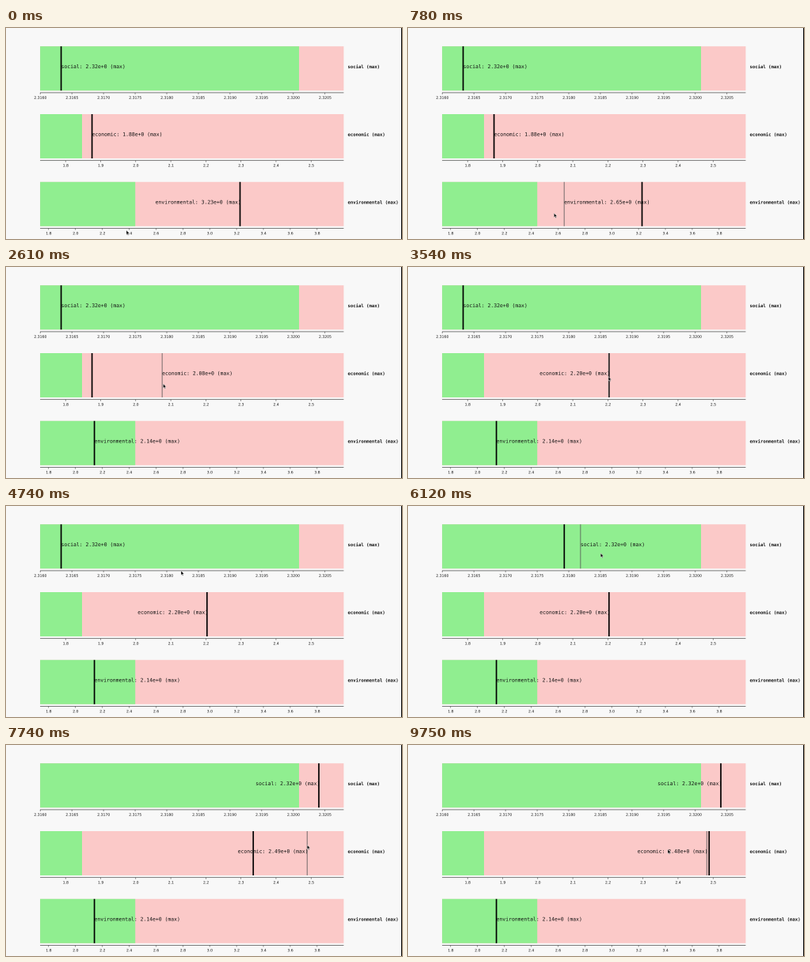
A matplotlib script that plays this animation: 500 by 267 pixels, repeating every 9780 ms.

```python
import numpy as np
import matplotlib.pyplot as plt
from matplotlib.animation import FuncAnimation
from matplotlib.patches import PathPatch, Polygon, Rectangle
from matplotlib.textpath import TextPath
from matplotlib.transforms import Affine2D

W, H, DPI = 500, 267, 72
STEP, FRAMES = 30, 326
LEFT, RIGHT, BAR_H = 43.1, 426.4, 56
HOVER_LAG = 90
MONO = "DejaVu Sans Mono"

# Pointer stops: arrival ms, departure ms, x, y. Leaving after a rest clicks.
STOPS = [
    (0, 0, 152, 256),
    (570, 570, 204.4, 236),
    (1270, 1410, 111.6, 228),
    (2570, 2570, 197.6, 148),
    (3100, 3420, 253.8, 140),
    (4740, 4740, 221, 82),
    (5200, 5870, 197.3, 61),
    (6670, 6750, 395, 55),
    (7200, 7290, 312.2, 132),
    (7640, 8040, 380.2, 126.5),
    (9660, 9660, 377.2, 132),
    (9750, 9750, 328, 132),
]

fig = plt.figure(figsize=(W / DPI, H / DPI), dpi=DPI, facecolor="#f8f8f8")
ax = fig.add_axes([0, 0, 1, 1])
ax.set(xlim=(0, W), ylim=(H, 0))
ax.axis("off")


def pointer(t):
    """Rest at each stop and ease in and out between stops."""
    for (_, leave, *start), (arrive, _, *end) in zip(STOPS, STOPS[1:]):
        if t <= arrive:
            u = np.clip((t - leave) / (arrive - leave), 0, 1)
            return np.array(start) + u * u * (3 - 2 * u) * np.subtract(end, start)
    return np.array(STOPS[-1][2:])


def glyphs(text, x, y, size, align=0.0, family=MONO, weight="normal"):
    """Text outline with its baseline at y; align is 0 left to 1 right."""
    path = TextPath((0, 0), text, size=size,
                    prop={"family": family, "weight": weight})
    shift = align * path.get_extents().x1
    return Affine2D().translate(-shift, 0).scale(1, -1).translate(x, y) \
        .transform_path(path)


def add_text(*args, color="#111", **style):
    return ax.add_patch(PathPatch(glyphs(*args, **style), fc=color, lw=0,
                                  snap=False, zorder=4))


def add_rect(x0, x1, top, height, color):
    ax.add_patch(Rectangle((x0, top), x1 - x0, height, fc=color, lw=0,
                           snap=False))


def add_line(xs, ys, color, width):
    return ax.plot(xs, ys, color=color, lw=width, snap=False,
                   solid_capstyle="butt", zorder=3)[0]


class Slider:
    """A range bar with an axis, a chosen value and a hover preview."""

    def __init__(self, row, name, split, start, tick0, tick_x, step, pitch,
                 fmt):
        self.name, self.start = name, start
        self.top = top = 23.2 + 85.8 * row
        self.to_value = lambda x: tick0 + (x - tick_x) / pitch * step

        add_rect(LEFT, RIGHT, top, BAR_H, "#fbc9c8")
        add_rect(LEFT, split, top, BAR_H, "#90ee90")
        axis_y = top + 58.7
        add_line([LEFT, RIGHT], [axis_y, axis_y], "#444", 0.7)
        for x in np.arange(tick_x, RIGHT - 0.1, pitch):
            add_line([x, x], [axis_y, axis_y + 2], "#444", 0.6)
            add_text(format(self.to_value(x), fmt), x, top + 66.5, 4.57,
                     align=0.5, family="DejaVu Sans")
        add_text(f"{name} (max)", 431.5, top + 27.7, 5.6, weight="bold")

        span = [top, top + BAR_H]
        self.chosen = add_line([0, 0], span, "black", 1.7)
        self.hover = add_line([0, 0], span, "#555", 0.8)
        self.label = add_text("-", 0, 0, 6.42)

    def contains(self, y):
        return self.top <= y <= self.top + BAR_H

    def update(self, t):
        chosen = self.start
        for arrive, leave, x, y in STOPS:
            if arrive < leave <= t and self.contains(y):
                chosen = x
        hx, hy = pointer(max(t - HOVER_LAG, 0))
        hovering = self.contains(hy)
        x = hx if hovering else chosen
        self.chosen.set_xdata([chosen, chosen])
        self.hover.set_xdata([hx, hx])
        self.hover.set_visible(hovering)
        self.label.set_path(glyphs(
            f"{self.name}: {self.to_value(x):.2f}e+0 (max)", x,
            self.top + 27.7, 6.42, align=float(x > (LEFT + RIGHT) / 2)))


sliders = [
    Slider(0, "social", 370, 69.6, 2.316, 43.2, 0.0005, 39.95, ".4f"),
    Slider(1, "economic", 96, 108.6, 1.8, 75.2, 0.1, 44.29, ".1f"),
    Slider(2, "environmental", 163.2, 295.5, 1.8, 53.8, 0.2, 33.9, ".1f"),
]
add_rect(499, W, 0, H, "black")

ARROW = np.array([(0, 0), (0, 5.4), (1.2, 4.3), (2, 6.2), (2.9, 5.8),
                  (2.1, 4), (3.8, 3.9)])
cursor = ax.add_patch(Polygon(ARROW, fc="black", ec="#e8e8e8", lw=0.4,
                              zorder=6))


def draw(frame):
    t = frame * STEP
    for slider in sliders:
        slider.update(t)
    cursor.set_xy(ARROW + pointer(t))
    return []


anim = FuncAnimation(fig, draw, frames=FRAMES, interval=STEP, repeat=True,
                     repeat_delay=0)
plt.show()
```
